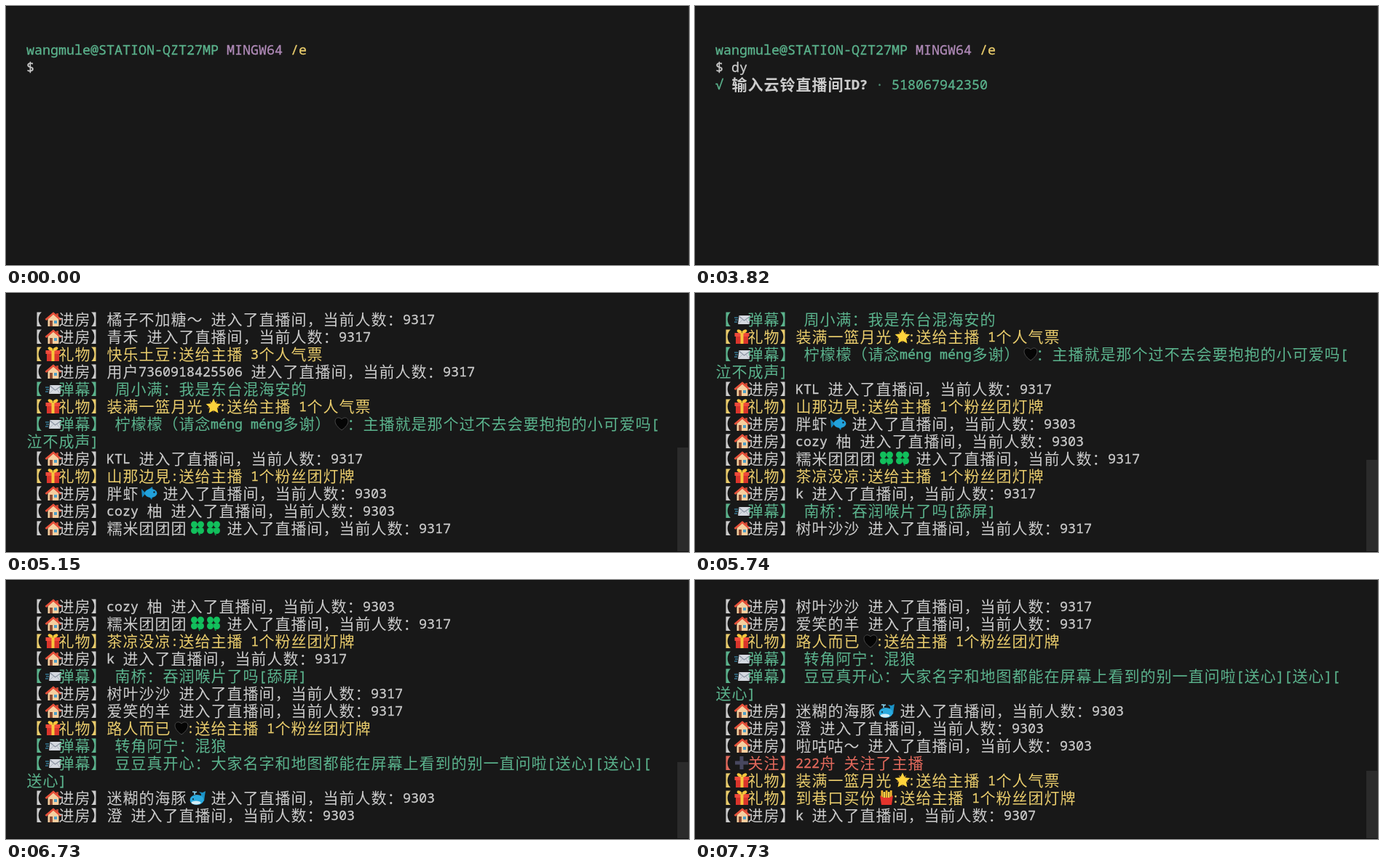
Recreate the animation shown at these times as an HTML page with a canvas. Size 938 px wide and 357 px high, loop 8 s.

```html
<!DOCTYPE html>
<html lang="zh-CN">
<head>
<meta charset="utf-8">
<title>Terminal</title>
<style>
html, body { margin: 0; width: 100%; height: 100%; overflow: hidden; background: #181818; }
canvas { display: block; width: 938px; height: 357px; }
</style>
</head>
<body>
<canvas id="stage"></canvas>
<script>
const W = 938, H = 357, LOOP = 8000;
const LEFT = 28, TOP = 24, CELL = 11, LINE = 24, COLS = 79, ROWS = 13;
const WHITE = '#cccccc', GREEN = '#5bb38d', YELLOW = '#e9cc6c', PURPLE = '#b18bb9',
      CYAN = '#6cb8c0', RED = '#e2695c', DIM = '#64687c';

const canvas = document.getElementById('stage');
const ctx = canvas.getContext('2d');
const ratio = window.devicePixelRatio || 1;
canvas.width = W * ratio;
canvas.height = H * ratio;

// Small shape helpers
function rect(color, x, y, w, h) {
  ctx.fillStyle = color;
  ctx.fillRect(x, y, w, h);
}
function poly(color, ...p) {
  ctx.fillStyle = color;
  ctx.beginPath();
  for (let i = 0; i < p.length; i += 2) ctx.lineTo(p[i], p[i + 1]);
  ctx.fill();
}
function line(color, width, ...p) {
  ctx.strokeStyle = color;
  ctx.lineWidth = width;
  ctx.beginPath();
  for (let i = 0; i < p.length; i += 2) ctx.lineTo(p[i], p[i + 1]);
  ctx.stroke();
}
function oval(color, x, y, rx, ry = rx, turn = 0) {
  ctx.fillStyle = color;
  ctx.beginPath();
  ctx.ellipse(x, y, rx, ry, turn, 0, Math.PI * 2);
  ctx.fill();
}
function star(color, x, y, outer, inner, n) {
  const pts = [];
  for (let i = 0; i < n * 2; i++) {
    const a = i * Math.PI / n - Math.PI / 2, r = i % 2 ? inner : outer;
    pts.push(x + r * Math.cos(a), y + r * Math.sin(a));
  }
  poly(color, ...pts);
}

// Each icon is drawn in a 22 by 22 box
const icons = {
  '🏠'() {
    rect('#b8432f', 15, 3, 3, 6);
    poly('#f5cfa0', 3.5, 11, 11, 4, 18.5, 11, 18.5, 21, 3.5, 21);
    rect('#8a4b32', 6, 13, 4, 8);
    rect('#4f9fc8', 12, 13, 4, 4);
    line('#e8513a', 2.8, 0.5, 12, 11, 3, 21.5, 12);
  },
  '📨'() {
    line('#3c87a8', 1.3, 0, 9, 5, 9);
    line('#3c87a8', 1.3, 1, 12, 5, 12);
    line('#3c87a8', 1.3, 0, 15, 4, 15);
    poly('#d5d9e0', 6.5, 6, 22, 6, 20.5, 18, 5, 18);
    line('#8b93a2', 1.2, 6.5, 7, 13.5, 13, 22, 7);
    line('#adb4c0', 1, 5, 18, 11, 12);
    line('#adb4c0', 1, 20.5, 18, 16, 12);
  },
  '🎁'() {
    rect('#d9342b', 2, 11, 17, 10);
    rect('#ef4a3b', 0.5, 6, 20, 5);
    rect('#f8c63c', 8.5, 6, 4, 15);
    oval('#f8c63c', 7, 4, 3.6, 2.2, 0.5);
    oval('#f8c63c', 14, 4, 3.6, 2.2, -0.5);
  },
  '➕'() {
    rect('#47475f', 7.5, 2, 5, 18);
    rect('#47475f', 1, 8.5, 18, 5);
  },
  '🌟'() {
    ctx.save();
    ctx.translate(11, 11);
    ctx.rotate(Math.PI);
    star('#e39a35', 0, 0, 9, 2.5, 5);
    ctx.restore();
    star('#fdd33c', 11, 11.5, 11, 5.2, 5);
  },
  '🖤'() {
    ctx.beginPath();
    ctx.moveTo(11, 20);
    ctx.bezierCurveTo(-5, 9, 4, -2, 11, 5);
    ctx.bezierCurveTo(18, -2, 27, 9, 11, 20);
    ctx.fillStyle = '#050505';
    ctx.fill();
    ctx.strokeStyle = '#4a4a4a';
    ctx.lineWidth = 1;
    ctx.stroke();
  },
  '🐟'() {
    poly('#1787bd', 6, 11, 0, 5, 1, 17);
    poly('#1787bd', 9, 6, 15, 2, 16, 8);
    poly('#1787bd', 10, 15, 14, 20, 16, 14);
    oval('#22a2dc', 13, 11, 8.5, 6);
    oval('#12212b', 17.5, 9.5, 1.2);
  },
  '🍀'() {
    line('#0b8a42', 2, 11, 11, 14, 21);
    for (const [x, y] of [[6.5, 6], [15.5, 6], [6.5, 14.5], [15.5, 14.5]]) oval('#12bf5c', x, y, 4.5);
  },
  '🐳'() {
    poly('#1b92c6', 15, 14, 16, 6, 13, 3, 18, 4, 22, 2, 21, 8, 20, 16);
    oval('#2aaade', 10, 14, 9.5, 7);
    oval('#d3eef8', 9, 18, 6.5, 2.6);
    oval('#12212b', 5, 13, 1.1);
    line('#8bd3ef', 1.5, 4, 3, 7, 3, 7, 7);
    line('#8bd3ef', 1.5, 10, 3, 7, 4);
  },
  '🍟'() {
    for (let i = 0; i < 5; i++) rect(i % 2 ? '#fbd24a' : '#f3b52e', 3.5 + i * 3.1, 1 + (i % 2) * 2, 2.7, 12);
    poly('#e4342c', 2, 8, 7, 11, 15, 11, 20, 8, 18, 21, 4, 21);
  }
};

const isWide = ch => ch in icons || ch.codePointAt(0) >= 0x2e80;
const cellsOf = ch => isWide(ch) ? 2 : 1;

function glyph(ch, x, y, color, bold) {
  if (ch in icons) {
    ctx.save();
    ctx.translate(x + 4, y + 1);
    icons[ch]();
    ctx.restore();
    return;
  }
  ctx.fillStyle = color;
  if (isWide(ch)) {
    ctx.font = (bold ? 'bold' : '300') + ' 21px "Noto Sans CJK SC", "Noto Sans CJK", sans-serif';
    ctx.fillText(ch, x + 0.5, y + 20);
    return;
  }
  ctx.font = (bold ? 'bold' : 'normal') + ' 18.33px "Noto Sans Mono", "DejaVu Sans Mono", monospace';
  ctx.fillText(ch, x, y + 19);
  // A hairline outline gives the Latin text its slightly sturdier stems
  ctx.strokeStyle = color;
  ctx.lineWidth = 0.3;
  ctx.strokeText(ch, x, y + 19);
}

function write(text, col, row, color, bold) {
  for (const ch of text) {
    glyph(ch, LEFT + col * CELL, TOP + row * LINE, color, bold);
    col += cellsOf(ch);
  }
}

function block(col, row, width, color) {
  rect(color, LEFT + col * CELL, TOP + row * LINE, width, LINE);
}

// Live feed
const enter = (name, count) => [WHITE, `【🏠进房】${name} 进入了直播间，当前人数：${count}`];
const say = (name, text) => [GREEN, `【📨弹幕】 ${name}：${text}`];
const gift = (name, what) => [YELLOW, `【🎁礼物】${name}:送给主播 ${what}`];
const follow = name => [RED, `【➕关注】${name} 关注了主播`];
const TICKET = '1个人气票', BADGE = '1个粉丝团灯牌';

const feed = [
  enter('晚风', 9317),
  enter('云上茶.', 9330),
  say('西瓜味的汽水', '怎么又忘吃啦'),
  enter('橘子不加糖～', 9317),
  enter('青禾', 9317),
  gift('快乐土豆', '3个人气票'),
  enter('用户7360918425506', 9317),
  say('周小满', '我是东台混海安的'),
  gift('装满一篮月光🌟', TICKET),
  say('柠檬檬（请念méng méng多谢）🖤', '主播就是那个过不去会要抱抱的小可爱吗[泣不成声]'),
  enter('KTL', 9317),
  gift('山那边見', BADGE),
  enter('胖虾🐟', 9303),
  enter('cozy 柚', 9303),
  enter('糯米团团团🍀🍀', 9317),
  gift('茶凉没凉', BADGE),
  enter('k', 9317),
  say('南桥', '吞润喉片了吗[舔屏]'),
  enter('树叶沙沙', 9317),
  enter('爱笑的羊', 9317),
  gift('路人而已🖤', BADGE),
  say('转角阿宁', '混狼'),
  say('豆豆真开心', '大家名字和地图都能在屏幕上看到的别一直问啦[送心][送心][送心]'),
  enter('迷糊的海豚🐳', 9303),
  enter('澄', 9303),
  enter('啦咕咕～', 9303),
  follow('222舟'),
  gift('装满一篮月光🌟', TICKET),
  gift('到巷口买份🍟', BADGE),
  enter('k', 9307)
];

function wrap([color, text]) {
  const rows = [''];
  let col = 0;
  for (const ch of text) {
    if (col + cellsOf(ch) > COLS) {
      rows.push('');
      col = 0;
    }
    rows[rows.length - 1] += ch;
    col += cellsOf(ch);
  }
  return rows.map(row => [color, row]);
}
const feedRows = feed.flatMap(wrap);

// [time, rows printed so far]
const prints = [[4950, 13], [5080, 14], [5150, 16], [5740, 20], [6140, 22], [6730, 27], [7130, 29], [7730, 32]];

function drawFeed(t) {
  const end = prints.filter(p => p[0] <= t).pop()[1];
  feedRows.slice(end - ROWS, end).forEach(([color, text], row) => write(text, 0, row, color));
  const thumb = Math.round((H - TOP) * ROWS / (end + 14));
  rect('#2b2b2b', 922, H - thumb, 15, thumb);
}

function drawPrompt(t) {
  const ROOM = '518067942350';
  write('wangmule@STATION-QZT27MP', 0, 1, GREEN);
  write('MINGW64', 25, 1, PURPLE);
  write('/e', 33, 1, YELLOW);
  write('$', 0, 2, WHITE);

  const typed = t < 670 ? '' : t < 740 ? 'd' : 'dy';
  write(typed, 2, 2, WHITE);
  if (t >= 600 && t < 1070) block(2 + typed.length, 2, 2, WHITE);
  if (t >= 1070 && t < 1620) block(0, 3, 2, WHITE);
  if (t < 1620) return;

  const done = t >= 3820;
  write(done ? '√' : '?', 0, 3, done ? GREEN : CYAN);
  write('输入云铃直播间ID?', 2, 3, WHITE, true);
  write(done ? '·' : '»', 20, 3, done ? '#4b8a70' : DIM);
  if (t >= 2740) write(ROOM, 22, 3, done ? GREEN : WHITE);
  if (!done) block(t < 2740 ? 22 : 22 + ROOM.length, 3, CELL, CYAN);
  if (t >= 4750) write('直播弹幕连接成功', 0, 4, WHITE);
}

function draw(t) {
  ctx.setTransform(ratio, 0, 0, ratio, 0, 0);
  rect('#181818', 0, 0, W, H);
  if (t < 4950) drawPrompt(t);
  else drawFeed(t);
  rect('#0f0f0f', 0, 0, W, 1);
  rect('#0f0f0f', 0, H - 1, W, 1);
  rect('#2b2b2b', W - 1, 0, 1, H);
}

const start = performance.now();
function tick() {
  draw((performance.now() - start) % LOOP);
  requestAnimationFrame(tick);
}
tick();
</script>
</body>
</html>
```
